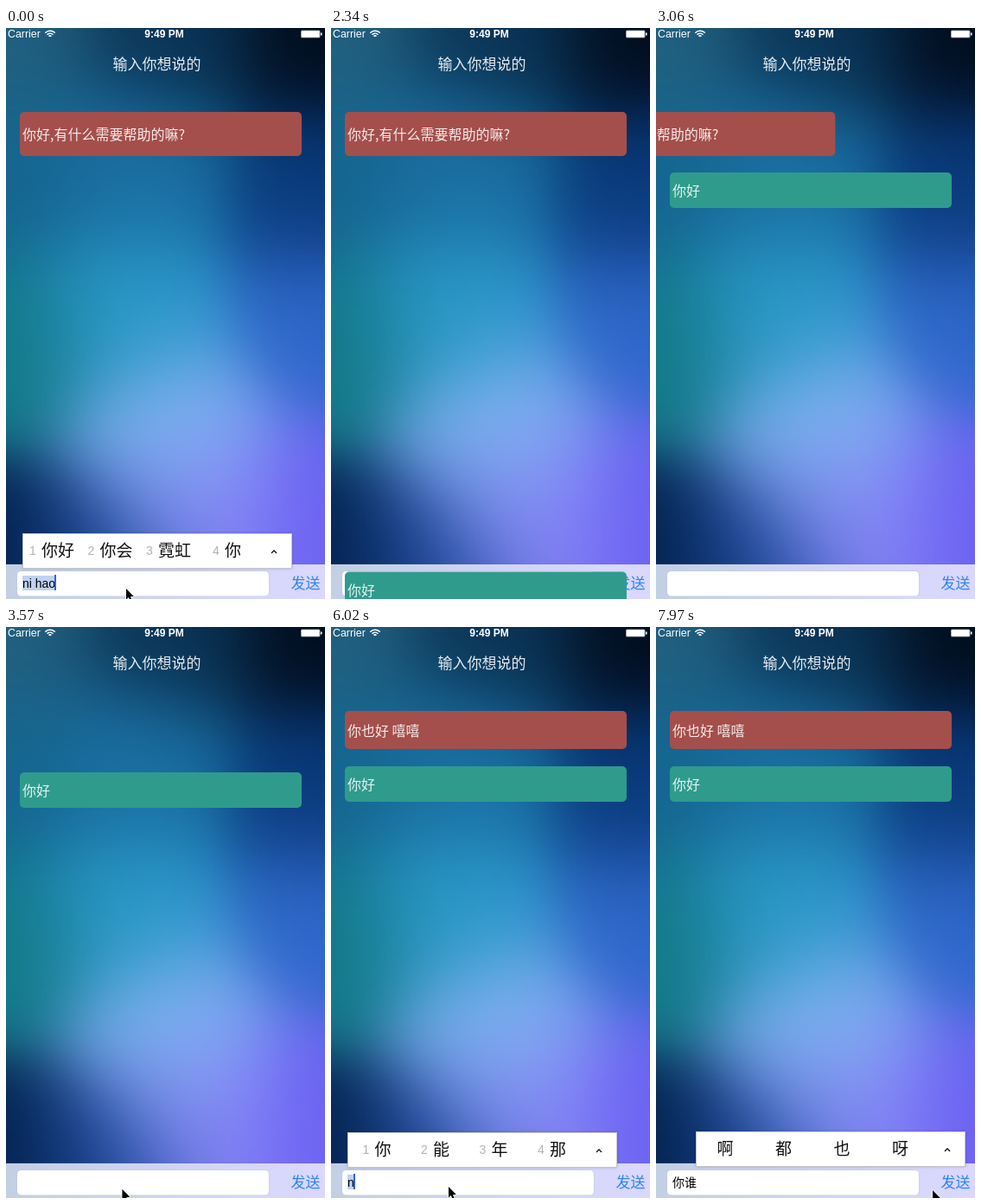
These frames come from a looping animation (369 by 660 pixels, 8 s). An HTML page with a canvas:

```html
<!DOCTYPE html>
<html lang="zh">
<head>
<meta charset="utf-8">
<title>Chat bubbles</title>
<style>
html, body { margin: 0; width: 100%; height: 100%; overflow: hidden; background: #05294f; }
canvas { display: block; width: 369px; height: 660px; }
</style>
</head>
<body>
<canvas id="stage"></canvas>
<script>
const W = 369, H = 660, LOOP = 8000;
const CJK = '"Noto Sans CJK SC", "Noto Sans CJK", sans-serif';
const LATIN = '"Liberation Sans", "Noto Sans CJK SC", "Noto Sans CJK", sans-serif';
const canvas = document.getElementById('stage');
const ctx = canvas.getContext('2d');
const dpr = window.devicePixelRatio || 1;
canvas.width = W * dpr;
canvas.height = H * dpr;

const clamp = v => Math.max(0, Math.min(1, v));
const progress = (t, a, b) => clamp((t - a) / (b - a));
const easeOut = p => 1 - (1 - p) ** 3;
const easeInOut = p => (1 - Math.cos(Math.PI * p)) / 2;
const mix = (a, b, p) => a + (b - a) * p;

// Step response of an underdamped spring, from 0 to 1.
function spring(age) {
  if (age <= 0) return 0;
  const damping = .55, speed = .0148;
  const root = Math.sqrt(1 - damping * damping);
  const swing = speed * root * age;
  return 1 - Math.exp(-damping * speed * age) * (Math.cos(swing) + damping / root * Math.sin(swing));
}

// Wallpaper: a few lights blended with Gaussian weights.
const LIGHTS = [
  [0, 0, '#22607f'], [190, 0, '#0a3355'], [369, 0, '#010c1c'],
  [0, 170, '#14658f'], [150, 170, '#1a70a4'], [369, 190, '#08397a'],
  [0, 370, '#117886'], [140, 330, '#2a9acb'], [369, 340, '#2f68cc'],
  [190, 470, '#80b4f0'], [0, 620, '#001c44'], [110, 620, '#1a4a9c'],
  [230, 570, '#8c88fa'], [369, 560, '#6a60f2']
].map(([x, y, hex]) => ({ x, y, rgb: [1, 3, 5].map(i => parseInt(hex.substr(i, 2), 16)) }));

function makeWallpaper() {
  const step = 4, spread = 68, w = Math.ceil(W / step), h = H / step;
  const image = document.createElement('canvas');
  image.width = w;
  image.height = h;
  const g = image.getContext('2d');
  const pixels = g.createImageData(w, h);
  for (let i = 0; i < w * h; i++) {
    const x = (i % w + .5) * step, y = (Math.floor(i / w) + .5) * step;
    const weights = LIGHTS.map(l => Math.exp(-((x - l.x) ** 2 + (y - l.y) ** 2) / (2 * spread ** 2)));
    const total = weights.reduce((a, b) => a + b);
    for (let c = 0; c < 3; c++) {
      pixels.data[i * 4 + c] = LIGHTS.reduce((sum, l, k) => sum + l.rgb[c] * weights[k], 0) / total;
    }
    pixels.data[i * 4 + 3] = 255;
  }
  g.putImageData(pixels, 0, 0);
  return { image, w: w * step, h: h * step };
}
const wallpaper = makeWallpaper();

function text(str, x, y, font, color, align = 'left') {
  ctx.font = font;
  ctx.fillStyle = color;
  ctx.textAlign = align;
  ctx.fillText(str, x, y);
}

function roundRect(x, y, w, h, r, fill) {
  ctx.beginPath();
  ctx.roundRect(x, y, w, h, r);
  ctx.fillStyle = fill;
  ctx.fill();
}

function statusBar() {
  text('Carrier', 2, 11, '12.4px ' + LATIN, '#fff');
  text('9:49 PM', 183, 11, 'bold 12px ' + LATIN, '#fff', 'center');
  ctx.strokeStyle = ctx.fillStyle = '#fff';
  ctx.lineWidth = 1.5;
  for (const r of [2, 4.8, 7.8]) {
    ctx.beginPath();
    ctx.arc(51, 11, r, -Math.PI * .76, -Math.PI * .24);
    ctx.stroke();
  }
  roundRect(341, 2.5, 22.5, 9, 1.5, 'rgba(255,255,255,.5)');
  roundRect(341.7, 3.2, 21, 7.6, 1, '#fff');
  ctx.fillRect(364, 5.5, 1.5, 3);
}

// What the input method shows, from each moment on.
const INPUT = [
  { at: -350, typing: 'ni hao', words: '你好 你会 霓虹 你' },
  { at: 820, done: '你好', words: '啊 吗 呀 吧' },
  { at: 1690, done: '你好', idle: true },
  { at: 2140, idle: true },
  { at: 5130 },
  { at: 6020, typing: 'n', words: '你 能 年 那' },
  { at: 6110, typing: 'ni', words: '你 呢 泥 尼' },
  { at: 6200, done: '你', words: '好 的 是 们' },
  { at: 6290, done: '你', typing: 's', words: '是 说 上 所' },
  { at: 6380, done: '你', typing: 'sh', words: '是 说 上 谁' },
  { at: 6470, done: '你', typing: 'shu', words: '书 数 树 输' },
  { at: 6560, done: '你', typing: 'shui', words: '谁 水 睡 税' },
  { at: 7030, done: '你谁', words: '啊 都 也 呀' }
];

// Solid after each keystroke, then a soft blink once a second.
function caretAlpha(age) {
  const phase = age % 1000;
  return 1 - progress(phase, 560, 680) + progress(phase, 950, 1000);
}

function inputBar(t, { at, done = '', typing = '', idle }) {
  const bar = ctx.createLinearGradient(0, 0, W, 0);
  bar.addColorStop(0, '#c2cfe4');
  bar.addColorStop(.5, '#d0d4f4');
  bar.addColorStop(1, '#dbd8ff');
  ctx.fillStyle = bar;
  ctx.fillRect(0, 620, W, 40);
  ctx.fillStyle = 'rgba(90,100,150,.45)';
  ctx.fillRect(0, 619.5, W, .5);
  roundRect(12.5, 627.5, 292, 29.5, 5, '#c3c7d8');
  roundRect(13, 628, 291, 28.5, 4.5, '#fff');

  ctx.globalAlpha = 1 - .7 * Math.sin(Math.PI * progress(t, 1690, 2080));
  text('发送', 329.5, 648.3, '17px ' + CJK, '#2b85f8');
  ctx.globalAlpha = 1;

  const font = '14px ' + LATIN;
  ctx.font = font;
  const start = 19 + ctx.measureText(done).width;
  const end = start + ctx.measureText(typing).width;
  ctx.fillStyle = '#bfd2f2';
  ctx.fillRect(start, 633, end - start, 17);
  text(done, 19, 647, font, '#000');
  text(typing, start, 647, font, '#000');
  if (idle) return;
  ctx.globalAlpha = caretAlpha(t - at);
  ctx.fillStyle = '#3460e2';
  ctx.fillRect(Math.round(end) - (typing ? 1 : 0), 632, 2, 18);
  ctx.globalAlpha = 1;
}

function popup({ done = '', typing, words }) {
  if (!words) return;
  const x = Math.round(19 + 13.5 * done.length), y = typing ? 584 : 583;
  const indent = typing ? 14 : 0;
  ctx.save();
  ctx.shadowColor = 'rgba(0,0,0,.2)';
  ctx.shadowBlur = 3 * dpr;
  ctx.fillStyle = '#fff';
  ctx.fillRect(x, y, 312, 41);
  ctx.restore();
  ctx.strokeStyle = '#c4c6cc';
  ctx.lineWidth = 1;
  ctx.strokeRect(x + .5, y + .5, 311, 40);
  words.split(' ').forEach((word, i) => {
    const left = x + 34 + 67.5 * i - word.length * 9.5 - indent / 2;
    if (typing) text(i + 1, left, y + 25, '14px ' + LATIN, '#b2b2b2');
    text(word, left + indent, y + 26.5, '19px ' + CJK, '#111');
  });
  ctx.strokeStyle = '#111';
  ctx.lineWidth = 1.4;
  ctx.beginPath();
  ctx.moveTo(x + 288, y + 23);
  ctx.lineTo(x + 291, y + 20);
  ctx.lineTo(x + 294, y + 23);
  ctx.stroke();
}

function bubble(str, x, y, h, color) {
  roundRect(x, y, 326, h, 5, color);
  text(str, x + 3, y + h / 2 + 6.6, '300 16px ' + CJK, 'rgba(255,255,255,.88)');
}

function bubbles(t) {
  const red = '#a44f4c';
  // The reply pauses at the top of its overshoot before it settles.
  const replyTime = t > 4440 && t < 4740 ? 4440 : t;
  bubble('你好,有什么需要帮助的嘛?', 16 - 385 * spring(t - 2990), 97, 51, red);
  bubble('你也好 嘻嘻', -326 + 342 * spring(replyTime - 4182), 97, 44, red);
  bubble('你好', 16, H - 492 * spring(t - 2314) - 7 * spring(t - 3950), 41, '#2f9b8d');
}

const MOVES = [
  { start: 210, end: 540, from: [139, 648], to: [352, 640], ease: easeInOut, lift: 48 },
  { start: 1980, end: 2170, from: [352, 640], to: [382, 641], ease: easeInOut, lift: 0 },
  { start: 3150, end: 3930, from: [120, 676], to: [136, 647], ease: easeOut, lift: 0 },
  { start: 7640, end: 7960, from: [136, 647], to: [320, 651], ease: easeInOut, lift: 0 }
];

function pointer(t) {
  const { start, end, from, to, ease, lift } = MOVES.filter(m => t >= m.start).pop() || MOVES[0];
  const p = ease(progress(t, start, end));
  ctx.save();
  ctx.translate(mix(from[0], to[0], p), mix(from[1], to[1], p) - lift * Math.sin(Math.PI * p));
  ctx.beginPath();
  [[0, 0], [0, 12.5], [2.8, 10], [4.8, 14.6], [6.8, 13.7], [4.9, 9.3], [8.8, 9]]
    .forEach(point => ctx.lineTo(...point));
  ctx.closePath();
  ctx.lineJoin = 'round';
  ctx.lineWidth = 1.4;
  ctx.strokeStyle = 'rgba(255,255,255,.9)';
  ctx.stroke();
  ctx.fillStyle = '#000';
  ctx.fill();
  ctx.restore();
}

function draw(t) {
  const input = INPUT.filter(s => t >= s.at).pop();
  ctx.setTransform(dpr, 0, 0, dpr, 0, 0);
  ctx.drawImage(wallpaper.image, 0, 0, wallpaper.w, wallpaper.h);
  statusBar();
  text('输入你想说的', 174.5, 48.3, '300 17px ' + CJK, 'rgba(255,255,255,.9)', 'center');
  inputBar(t, input);
  popup(input);
  bubbles(t);
  pointer(t);
}

// Poses advance on a 10 ms clock.
const begin = performance.now();
function tick() {
  draw(Math.round((performance.now() - begin) / 10) * 10 % LOOP);
  requestAnimationFrame(tick);
}
tick();
</script>
</body>
</html>
```
